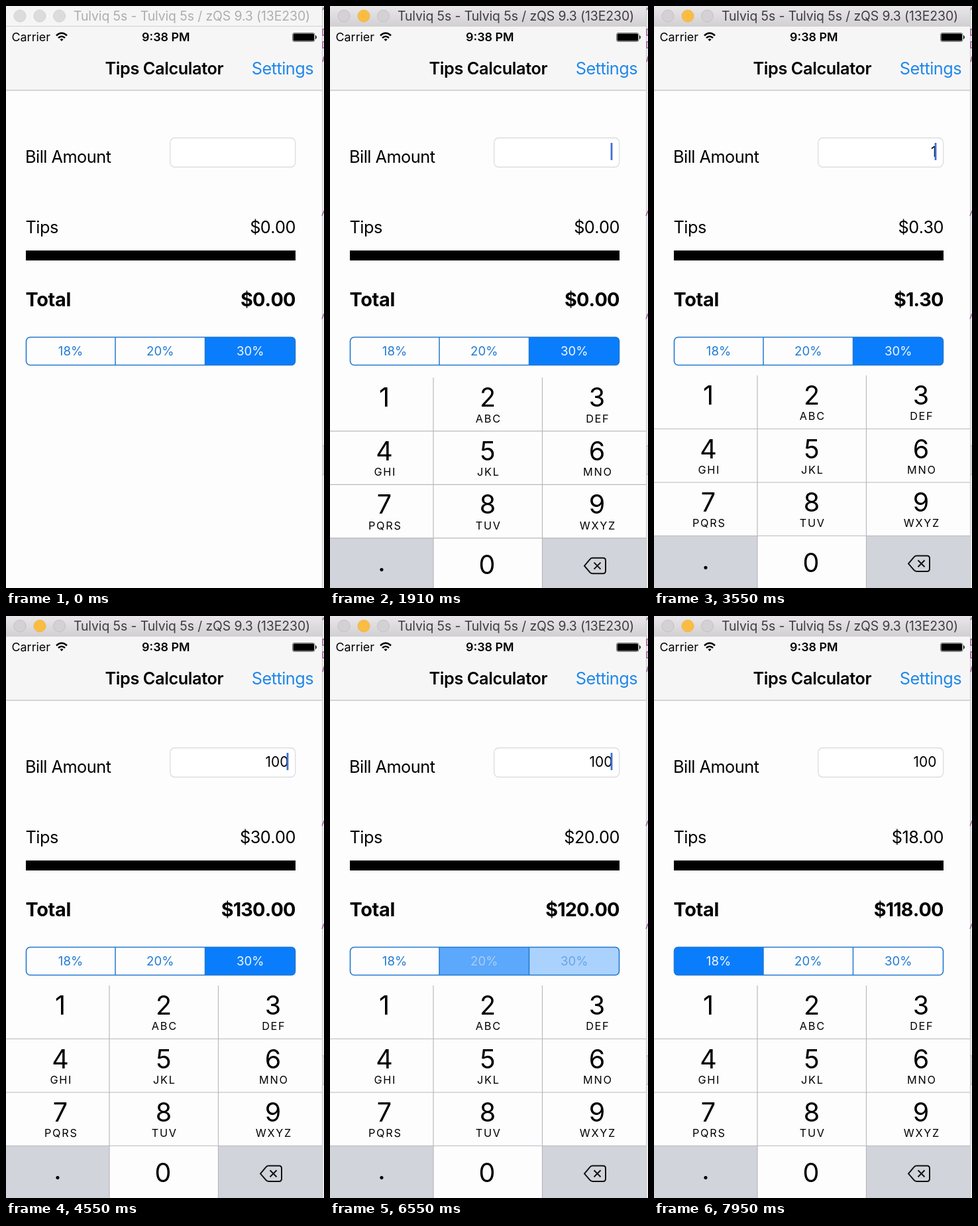
Animation of 480 by 876 pixels, one loop 8000 ms. Source, as an HTML page:

```html
<!DOCTYPE html>
<html lang="en">
<head>
<meta charset="utf-8">
<title>Tips Calculator</title>
<style>
  html, body { margin: 0; width: 100%; height: 100%; overflow: hidden; background: #fefdfe; }
  svg { display: block; width: 100%; height: 100%; }
  text { font-family: Inter, Roboto, sans-serif; white-space: pre; }
  .body { font-size: 25.3px; letter-spacing: -.02em; }
  .title { font-size: 25.3px; font-weight: 600; letter-spacing: -.016em; }
  .strong { font-size: 28.8px; font-weight: 700; letter-spacing: -.01em; }
  .amount { text-anchor: end; font-kerning: none; }
  .strong.amount { letter-spacing: -.03em; }
  .small { font-size: 17.9px; }
  .window { font-size: 19.4px; letter-spacing: -.005em; }
  .link { fill: #1f88ea; }
  .segment { font-size: 18.6px; }
  .digit { font-size: 39.5px; }
  .letters { font-size: 16.3px; letter-spacing: 1.7px; }
  .mid { text-anchor: middle; }
</style>
</head>
<body>
<svg viewBox="0 0 480 876" xmlns="http://www.w3.org/2000/svg">
  <defs>
    <linearGradient id="activeBar" x2="0" y2="1">
      <stop stop-color="#e9e7e9"/><stop offset="1" stop-color="#d2d0d2"/>
    </linearGradient>
    <clipPath id="segmentClip"><rect x="30" y="498" width="407" height="43" rx="6"/></clipPath>
    <clipPath id="windowClip"><rect width="477" height="876"/></clipPath>
  </defs>

  <!-- Strip of the desktop behind the window -->
  <rect width="480" height="876" fill="#fefdfe"/>
  <rect x="477" width="3" height="876" fill="#efeef0"/>
  <rect x="477" y="662" width="3" height="43" fill="#dddcde"/>
  <path d="M477 662h3M477 705h3" stroke="#aaa"/>
  <path d="M477.5 0v876" stroke="#c6c5c7"/>
  <path d="M480 35h-2v9h2M480 54h-2v9h2M480 76l-2 8M480 308l-3 8M480 463l-3 8M480 2l-2 4"
        fill="none" stroke="#a0569c" stroke-width="1.4"/>

  <!-- Window title bar -->
  <rect id="bar" width="477" height="30"/>
  <path d="M0 30.5h477" stroke="#d0cfd1"/>
  <g id="lights">
    <circle cx="21" cy="15" r="9"/><circle cx="51" cy="15" r="9"/><circle cx="80.5" cy="15" r="9"/>
  </g>
  <text id="windowTitle" class="window" x="102" y="22">Tulviq 5s - Tulviq 5s / zQS 9.3 (13E230)</text>

  <!-- Status and navigation bars -->
  <rect y="31" width="477" height="95.5" fill="#f7f6f7"/>
  <path d="M0 126.8h477" stroke="#bfbec1" stroke-width="1.3"/>
  <text class="small" x="8.5" y="53">Carrier</text>
  <g fill="none" stroke="#000" stroke-width="2.5">
    <path d="M76 44.5q8-7.4 16 0M79 48q5-4.4 10 0"/>
    <path d="M81.5 50.3q2.5-2 5 0l-2.5 2.8z" fill="#000" stroke="none"/>
  </g>
  <text class="small mid" font-weight="600" x="241.3" y="53">9:38 PM</text>
  <rect x="432.5" y="40.5" width="33.5" height="13" rx="2.5" fill="none" stroke="#777"/>
  <rect x="433.5" y="41.5" width="31.5" height="11" rx="1.5"/>
  <path d="M467.5 44.5q2 2.5 0 5z" stroke="#222"/>
  <text class="title" x="149.5" y="103">Tips Calculator</text>
  <text class="body link" x="370.7" y="103">Settings</text>

  <!-- Form -->
  <text class="body" x="29" y="236">Bill Amount</text>
  <rect x="247.7" y="198.5" width="189" height="44" rx="7" fill="#fff" stroke="#dcdce0" stroke-width="1.3"/>
  <text id="bill" class="amount" font-size="20.9" x="426.4" y="227"></text>
  <rect id="caret" x="423.6" y="206" width="2.8" height="26" fill="#426fcf"/>
  <text class="body" x="29.5" y="342">Tips</text>
  <text id="tip" class="body amount" x="437" y="342"></text>
  <rect x="30" y="368" width="407" height="15"/>
  <text class="strong" x="29.5" y="452">Total</text>
  <text id="total" class="strong amount" x="436.5" y="452"></text>

  <g id="segments" clip-path="url(#segmentClip)"></g>
  <path d="M165 498v43M300.5 498v43" stroke="#2079cf" stroke-width="1.5"/>
  <rect x="30.5" y="498.5" width="406" height="42" rx="6" fill="none" stroke="#2079cf" stroke-width="1.6"/>

  <g clip-path="url(#windowClip)"><g id="keyboard"></g></g>
</svg>

<script>
const LOOP = 8000;
const FOCUS = 1550;
const RATES = [18, 20, 30];
const KEYS = [
  { key: '1', down: 3030, up: 3150 },
  { key: '0', down: 3820, up: 3930 },
  { key: '0', down: 4200, up: 4310 },
];
const CHOICES = [
  { at: -1000, index: 2 },
  { at: 6385, index: 1 },
  { at: 7590, index: 0 },
];
const FADE = 250;

const $ = id => document.getElementById(id);
const clamp = v => Math.min(1, Math.max(0, v));
const money = v => '$' + v.toFixed(2);

// Segmented control: each part cross-fades between its plain and filled look.
const EDGES = [30, 165, 300.5, 437];
$('segments').innerHTML = RATES.map((rate, i) => {
  const x = EDGES[i], width = EDGES[i + 1] - x;
  const label = `class="segment mid" x="${x + width / 2}" y="526"`;
  return `<text ${label} fill="#217bd2">${rate}%</text>
    <g><rect x="${x}" y="498" width="${width}" height="43" fill="#0a7dfc"/>
    <text ${label} fill="#f2f8ff">${rate}%</text></g>`;
}).join('');
const fills = [...$('segments').querySelectorAll('g')];

// Number pad
const COLUMNS = [0, 156, 320.5, 477];
const CENTERS = [82, 238, 403];
const TOP = 556, ROW = 80.5;
const PAD = ['1', '2 ABC', '3 DEF', '4 GHI', '5 JKL', '6 MNO', '7 PQRS', '8 TUV', '9 WXYZ', '.', '0', ''];
const GRAY = '#d1d4da', WHITE = '#fefdfe';
$('keyboard').innerHTML = PAD.map((cap, i) => {
  const col = i % 3, row = Math.floor(i / 3);
  const [digit, letters = ''] = cap.split(' ');
  const x = COLUMNS[col], y = TOP + row * ROW, center = CENTERS[col];
  const special = row === 3 && col !== 1;
  const digitX = row === 3 ? (col ? 237 : 78) : center;
  const baseline = y + (row === 3 ? (col ? 54 : 50.5) : 44);
  return `<rect data-key="${digit}" x="${x}" y="${y}" width="${COLUMNS[col + 1] - x}" height="${ROW}"
      fill="${special ? GRAY : WHITE}"/>
    <text class="digit mid" x="${digitX}" y="${baseline}">${digit}</text>
    <text class="letters mid" x="${center + 1.3}" y="${y + 67.3}">${letters}</text>`;
}).join('') + `
  <path d="M0 ${TOP + ROW}h477M0 ${TOP + 2 * ROW}h477M0 ${TOP + 3 * ROW}h477
    M156 ${TOP}v323M320.5 ${TOP}v323" stroke="#b9b9bc" stroke-width="1.2"/>
  <path d="M384 839.3l8.5-10q1.5-1.8 4-1.8h15.5q4 0 4 4v15.5q0 4-4 4h-15.5q-2.5 0-4-1.8z
    M398.5 834.3l10 10M408.5 834.3l-10 10" fill="none" stroke="#111" stroke-width="2"/>`;

function drawWindow(active) {
  $('bar').setAttribute('fill', active ? 'url(#activeBar)' : '#f6f5f6');
  $('windowTitle').setAttribute('fill', active ? '#3f3e40' : '#aeadaf');
  [...$('lights').children].forEach((light, i) => {
    const lit = active && i === 1;
    light.setAttribute('fill', lit ? '#fabd42' : active ? '#d3d1d3' : '#dddcdd');
    light.setAttribute('stroke', lit ? '#eeb650' : active ? '#c3c1c3' : '#d2d1d2');
  });
}

function drawKeyboard(t) {
  // Critically damped spring
  const s = Math.max(0, t - FOCUS) / 1000 * 18.26;
  const rest = (1 + s) * Math.exp(-s);
  $('keyboard').setAttribute('transform', `translate(0 ${323 * rest})`);
  for (const key of ['0', '1']) {
    const pressed = KEYS.some(k => k.key === key && t >= k.down && t < k.up);
    $('keyboard').querySelector(`[data-key="${key}"]`).setAttribute('fill', pressed ? GRAY : WHITE);
  }
}

function drawForm(t) {
  const typed = KEYS.filter(k => t >= k.up);
  const text = typed.map(k => k.key).join('');
  const step = CHOICES.filter(c => t >= c.at).length - 1;
  const choice = CHOICES[step], amount = Number(text);
  const tip = amount * RATES[choice.index] / 100;
  $('bill').textContent = text;
  $('tip').textContent = money(tip);
  $('total').textContent = money(amount + tip);

  const progress = clamp((t - choice.at) / FADE);
  fills.forEach((fill, i) => {
    const leaving = step > 0 && CHOICES[step - 1].index === i;
    fill.setAttribute('opacity', i === choice.index ? progress : leaving ? 1 - progress : 0);
  });

  // The caret blinks once a second, starting anew with each key.
  const phase = (t - (typed.length ? typed[typed.length - 1].up : FOCUS)) % 1000;
  const blink = clamp((550 - phase) / 100) + clamp((phase - 920) / 80);
  $('caret').setAttribute('opacity', t < FOCUS ? 0 : blink);
}

function frame() {
  const t = performance.now() % LOOP;
  drawWindow(t >= FOCUS);
  drawKeyboard(t);
  drawForm(t);
  requestAnimationFrame(frame);
}
frame();
</script>
</body>
</html>
```
